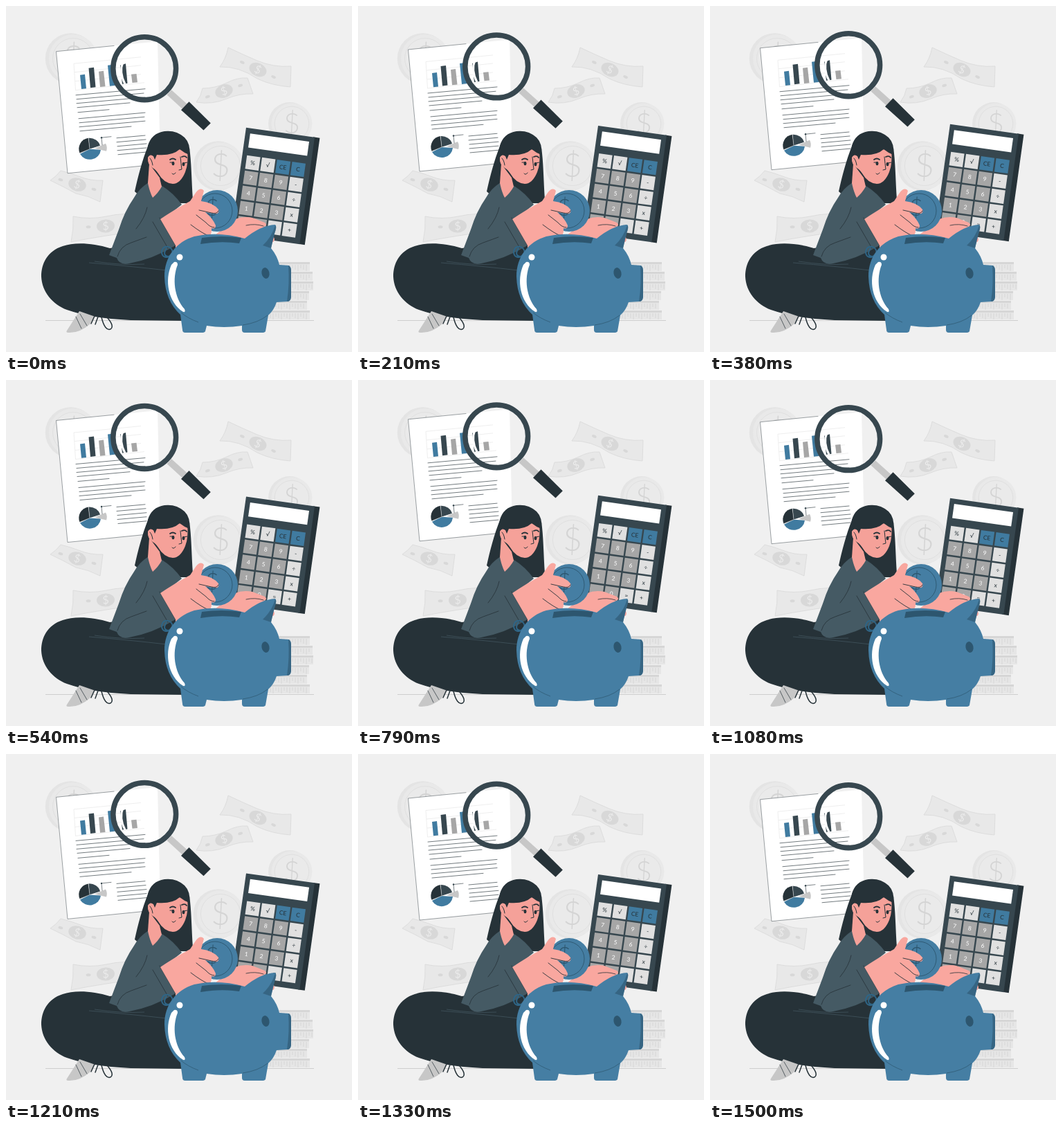
These frames come from a looping animation (500 by 500 pixels, 1.54 s). An HTML page:

```html
<!DOCTYPE html>
<html lang="en">
<head>
<meta charset="utf-8">
<title>Savings</title>
<style>
html, body { margin: 0; height: 100%; overflow: hidden; background: #f0f0f0; }
svg { display: block; width: 100vw; height: 100vh; }
text { font-family: Lato, sans-serif; text-anchor: middle; }
.ink { fill: #263238; }
.slate { fill: #37474f; }
.blue { fill: #407ba0; }
.pig { fill: #457ea3; }
.deep { fill: #2d566f; }
.gray { fill: #a6a6a6; }
.skin { fill: #f5a199; }
.hand { fill: #f9a79f; }
.knit { fill: #455a64; }
.line { fill: none; stroke: #263238; stroke-linecap: round; stroke-linejoin: round; }
</style>
</head>
<body>
<svg viewBox="0 0 500 500">
  <g id="backdrop"></g>
  <path d="M57 454.500H445" stroke="#b8b8b8" stroke-width=".6"/>

  <g class="float">
    <path d="M72.500 66L219 51.500L223 228L89 242Z" fill="#fff"/>
    <path class="line" stroke-width=".45" d="M156 57.700L72.500 66L89 242L205 230.500"/>
    <path d="M98 83.500L100.500 122L200 111M98 83.500L195 74M99 96L195 86M100 109L195 99" fill="none" stroke="#e2e2e2" stroke-width=".6"/>
    <path class="blue" d="M107 100L114 99L116 119.500L109 120.300ZM147 86L155 85L158 115L150 116Z"/>
    <path class="slate" d="M119.500 90L127 89L129.500 117.500L122 118.500Z"/>
    <path class="gray" d="M134 95L141 94L143.500 116.500L136 117.300ZM181 99L188.500 98.300L190 110.500L182.500 111.300Z"/>
    <g id="lines" class="line" stroke-width=".65"></g>
    <path class="blue" d="M121 207L137 208A16 15.500 0 0 1 107 214Z"/>
    <path class="ink" d="M121 207L106.500 213A16 16 0 0 1 119 191Z"/>
    <path class="slate" d="M121 207L119.500 191A16 15 0 0 1 136 202Z"/>
    <path d="M121 207L119 191M106 213L121 207L136 203" fill="none" stroke="#fff" stroke-width=".4"/>
    <path d="M128 206L144 199Q147 204 145 210Z" fill="#c7c7c7"/>
    <path class="line" stroke-width=".6" d="M139 201L138 190.500L152 189"/>
    <circle class="slate" cx="138" cy="190.500" r="1.200"/>

    <path class="slate" d="M165 86L173 83.500L175.500 112L168 113Z"/>
    <path d="M169 81Q163 96 172 113" fill="none" stroke="#fff" stroke-width="3"/>
    <circle cx="200.200" cy="90.500" r="45.400" fill="none" stroke="#37474f" stroke-width="7.500"/>
    <path d="M239 121.500L263 143L256 150L232.500 128.500Z" fill="#c7c7c7"/>
    <path class="ink" d="M264.500 138.500L295.800 169.500L285.500 179.800L253 150.500Z"/>
  </g>

  <g class="float">
    <g transform="translate(347 176) rotate(8)">
      <path class="ink" d="M98 0H107.500V156H98Z"/>
      <path class="slate" d="M0 0H100V156H0Z"/>
      <path d="M7 7.500H93V28H7Z" fill="#fff"/>
      <g id="keys" font-size="8.500"></g>
    </g>
  </g>

  <!-- hair, body -->
  <path class="ink" d="M206 200C196 225 191 246 186 268L205 285H262L270 280C268 250 268 225 265 205L240 190Z"/>
  <path class="ink" d="M150 350C125 342 98 341 82 347C60 354 51 372 51 391C52 413 67 431 88 439C110 447 140 452 180 454L262 455V335Z"/>
  <path d="M88 469L106 441L129 449L121 460Q106 473 90 472Q86 472 88 469Z" fill="#c7c7c7"/>
  <path class="line" stroke-width=".7" d="M101 449L109 466M107 445L117 462"/>
  <path class="line" stroke-width="1.500" d="M128 448L123 459M133 449L129 460M138 450Q143 470 151 467Q157 463 147 451"/>
  <path d="M120 371Q180 376 232 382M128 369Q165 375 200 373" fill="none" stroke="#455a64" stroke-width=".7"/>
  <path class="knit" d="M206 255Q192 264 185 277Q171 297 163 323L149 360L160 364Q164 375 178 372Q212 366 245 346L230 306L254 287Q242 270 224 259Z"/>
  <path class="line" stroke-width=".8" d="M204 291Q201 306 188 322M161 362Q165 347 181 342L203 334M222 306L245 346M212 312L234 350"/>
  <path class="skin" d="M207 228L205 256Q208 270 212 277Q220 270 225 261L222 248Z"/>
  <path class="skin" d="M213 208L262 207Q264 228 259 240Q252 257 241 257Q228 256 220 242Q216 236 212 234Q204 229 205 219Q208 213 213 217Z"/>
  <path class="ink" d="M215 222L218 215Q240 217 251 207Q257 212 265 215Q267 199 258 190Q246 179 229 181Q210 184 205 202L203 219Q208 209 213 217Z"/>
  <path class="line" stroke-width="1" d="M252 218Q253 228 254 236L250 237M240 242Q242 245 245 241M208 220Q211 223 212 230"/>
  <path class="line" stroke-width="1.800" d="M237 222Q241 219 245 222M254 218Q259 216 261 219"/>
  <ellipse class="ink" cx="241.500" cy="227.500" rx="2" ry="2.700"/>
  <ellipse class="ink" cx="256.500" cy="228.500" rx="2" ry="2.700"/>
  <path class="line" stroke-width="1" d="M237 226L241 226M257 227L262 226"/>

  <!-- far hand, coin, near hand -->
  <path class="hand" d="M296 336Q318 318 331 308Q343 303 356 306L374 313Q379 317 372 319L387 334Q390 340 384 342L360 340Z"/>
  <path class="line" stroke-width=".8" d="M347 317Q360 314 372 318"/>
  <circle class="pig" cx="305" cy="296" r="30"/>
  <path class="deep" d="M305 266A30 30 0 0 1 317 323A30 30 0 0 0 305 266Z" opacity=".65"/>
  <circle cx="302" cy="296" r="25" fill="none" stroke="#2d566f" stroke-width=".9"/>
  <text class="deep" x="298" y="303" font-size="34" font-weight="300">$</text>
  <path class="hand" d="M223 308Q242 295 266 282L274 270Q281 261 286 267L282 282Q299 284 307 294Q309 301 301 300L288 298Q299 307 303 317Q303 323 297 321Q298 332 291 334L284 341L245 352V346Z"/>
  <path class="line" stroke-width=".9" d="M307 296Q305 301 297 299L279 295M301 320Q295 320 289 313L275 302M293 332Q284 329 267 316"/>

  <!-- piggy bank -->
  <path d="M242 361Q225 367 225 355Q227 345 237 349Q245 356 235 362Q225 361 232 350" fill="none" stroke="#2f6586" stroke-width="2"/>
  <path class="pig" d="M345 336Q368 317 389 316Q392 318 388 329L383 350Q392 361 395 374L409 375Q412 377 412 382V421Q411 427 407 427L391 428Q387 440 379 447L375 470Q374 472 370 472H345Q341 472 341 468V462Q315 466 290 462L288 470Q287 472 283 472H259Q255 472 255 468L252 446Q230 426 229 391C229 362 246 341 272 333Q306 325 345 336Z"/>
  <path class="deep" d="M283 335Q311 331 340 335L337 343Q310 339 281 344Z"/>
  <path class="deep" d="M389 317Q392 318 388 329L383 350L371 346Q384 334 389 317ZM408 375Q412 377 412 382V421Q411 427 406 427Q410 400 408 375Z" opacity=".6"/>
  <ellipse class="deep" cx="375" cy="386" rx="5.500" ry="8" transform="rotate(-12 375 386)"/>
  <path d="M253 443Q262 451 278 457M342 461Q364 458 378 447" fill="none" stroke="#2d566f" stroke-width=".7"/>
  <circle cx="251" cy="363" r="4.500" fill="#fff"/>
  <path d="M243 370Q248 369 248 374C240 394 243 421 258 438Q260 443 256 442C234 428 229 396 239 374Z" fill="#fff"/>
</svg>
<script>
const put = (id, html) => document.getElementById(id).innerHTML = html;

const coin = (x, y, r) => `
  <circle cx="${x - r * .1}" cy="${y}" r="${r * 1.05}" fill="#e4e4e4"/>
  <circle cx="${x}" cy="${y}" r="${r}" fill="#e9e9e9"/>
  <circle cx="${x}" cy="${y}" r="${r * .84}" fill="#eaeaea" stroke="#e0e0e0"/>
  <text x="${x}" y="${y + r * .47}" font-size="${r * 1.4}" font-weight="300" fill="#d4d4d4">$</text>`;

const note = (x, y, turn, shape) => `
  <path d="${shape}" fill="#e8e8e8" stroke="#d9d9d9" stroke-width=".8"/>
  <g transform="translate(${x} ${y}) rotate(${turn})" fill="#d8d8d8">
    <ellipse rx="13" ry="9.500"/>
    <ellipse cx="-25" rx="3.500" ry="2"/><ellipse cx="25" rx="3.500" ry="2"/>
    <text y="5.500" font-size="16" fill="#ebebeb">$</text>
  </g>`;

const stack = [439, 443, 444, 438, 435, 439].map((right, i) => {
  const y = 370 + i * 14;
  let ticks = "";
  for (let x = 382; x < right - 1; x += 4) ticks += `M${x} ${y + 4}v${5 + x % 3 * 2}`;
  return `<path d="M370 ${y}H${right}V${y + 13}H370Z" fill="#e6e6e6"/>
    <path d="M370 ${y}H${right}V${y + 3}H370Z" fill="#d6d6d6"/>
    <path d="${ticks}" stroke="#d6d6d6"/>`;
}).join("");

put("backdrop",
  coin(97, 76, 35) + coin(310, 231, 34) + coin(413, 170, 29.500) +
  note(364, 92, 25, "M321 60Q342 70 363 79Q387 89 412 87L411 117Q384 115 363 105Q337 87 309 88Q318 76 321 60Z") +
  note(315, 123, -19, "M284 119Q302 119 319 111Q334 103 349 104L357 127Q338 126 319 134Q298 143 275 139Q282 130 284 119Z") +
  note(103, 258, 16, "M79 238Q92 241 105 246Q122 253 140 252L136 283Q119 274 101 271Q83 261 64 252Q73 246 79 238Z") +
  note(144, 318, -3, "M97 304Q121 309 145 304Q171 298 196 302V331Q171 327 145 332Q119 336 94 341Q98 322 97 304Z") +
  stack);

// each row: left x, left y, right x
const rows = [
  [101, 129, 201], [102, 135, 199], [102, 141, 201], [103, 147, 179], [104, 154, 149],
  [105, 163, 201], [106, 169, 200], [106, 175, 201], [107, 181, 181],
  [160, 191, 201], [160, 197, 202], [161, 203, 203], [161, 209, 203], [162, 215, 203]
];
put("lines", rows.map(([x, y, end]) =>
  `<path d="M${x} ${y}L${end} ${y - (end - x) * .09}"/>`).join(""));

const labels = ["%", "√", "CE", "C", "7", "8", "9", "-", "4", "5", "6", "÷", "1", "2", "3", "x", ".", "0", "=", "+"];
put("keys", labels.map((label, i) => {
  const x = 16.600 + i % 4 * 22, y = 49.300 + Math.floor(i / 4) * 22.100;
  const digit = /[\d.]/.test(label), blue = label[0] === "C";
  return `<rect x="${x - 9.800}" y="${y - 9.800}" width="19.600" height="19.600" fill="${digit ? "#a6a6a6" : blue ? "#407ba0" : "#e0e0e0"}"/>
    <text x="${x}" y="${y + 3}" fill="${digit ? "#fff" : "#263238"}">${label}</text>`;
}).join(""));

const LOOP = 1540, STEP = 1000 / 24, PERIOD = 1500, RISE = 10;
const floats = document.querySelectorAll(".float");

function draw(now) {
  // 24 steps per second, linear rise and fall
  const step = Math.min(36, Math.floor((now % LOOP + 4) / STEP));
  const phase = (step * STEP + 20) % PERIOD / PERIOD;
  const y = -RISE * (1 - Math.abs(1 - 2 * phase));
  floats.forEach(g => g.setAttribute("transform", `translate(0 ${y})`));
  requestAnimationFrame(() => draw(performance.now()));
}
draw(performance.now());
</script>
</body>
</html>
```
